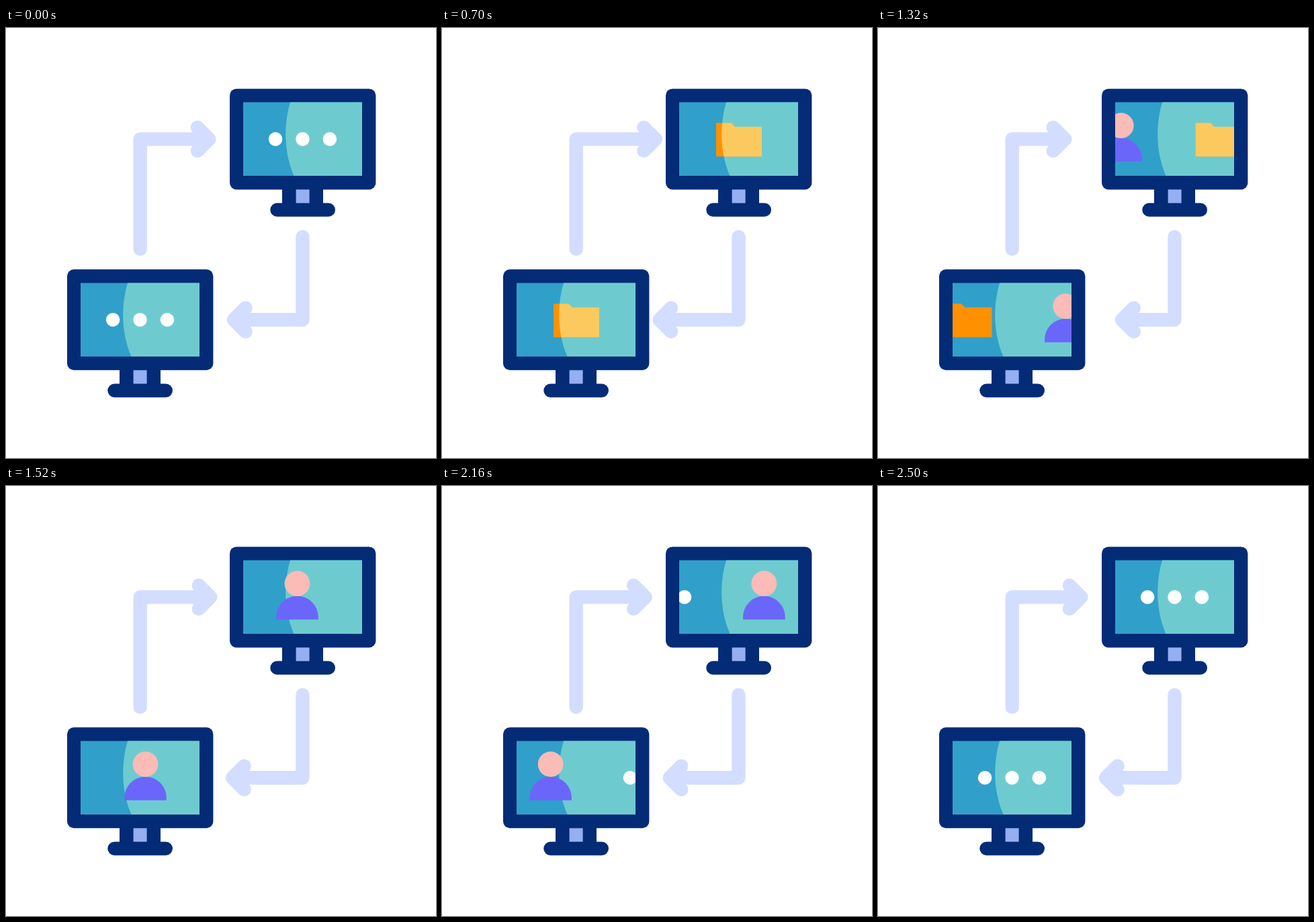
These frames come from a looping animation (640 px wide and 640 px high, 3 s). An HTML page:

```html
<!DOCTYPE html>
<html lang="en">
<head>
<meta charset="utf-8">
<title>Data exchange</title>
<style>
  html, body { margin: 0; width: 100%; height: 100%; overflow: hidden; background: #fff; }
  svg { display: block; width: 100%; height: 100%; }
  .arrow { fill: none; stroke: #d3ddff; stroke-width: 20.4; stroke-linecap: round; stroke-linejoin: round; }
</style>
</head>
<body>
<svg viewBox="0 0 640 640">
  <defs>
    <clipPath id="screen"><path d="M353 110.5H530V220H353Z"/></clipPath>
    <clipPath id="bright"><path id="glare" d="M423 110.5C412.5 146 414 187 428.5 220H530V110.5Z"/></clipPath>
    <path id="folder" d="M408 141.3H430.5L436 146.9H476V191.3H408Z"/>
    <g id="case">
      <path fill="#042b75" d="M411 235H472V265H411Z"/>
      <rect fill="#042b75" x="333" y="90.4" width="217.4" height="150" rx="10"/>
      <rect fill="#042b75" x="393.3" y="260.6" width="96.7" height="20.2" rx="10.1"/>
      <path fill="#94aff2" d="M431.6 240.4H451.6V260.6H431.6Z"/>
      <path fill="#309fca" d="M353 110.5H530V220H353Z"/>
      <use href="#glare" fill="#6dcbcf"/>
    </g>
    <g id="dots" fill="#fff">
      <circle cx="401.1" cy="165.4" r="10.3"/>
      <circle cx="441.5" cy="165.4" r="10.3"/>
      <circle cx="481.9" cy="165.4" r="10.3"/>
    </g>
    <g id="person">
      <path fill="#6b66fa" d="M410.2 198.8V195A31.3 31.3 0 0 1 472.8 195V198.8Z"/>
      <circle fill="#fbbbb7" cx="441.5" cy="145.2" r="18.9"/>
    </g>
  </defs>
  <path id="arrowUp" class="arrow"/>
  <path id="arrowDown" class="arrow"/>
  <g id="monitors"></g>
</svg>
<script>
const $ = id => document.getElementById(id);

const monitor = (x, y) => `<g transform="translate(${x} ${y})">
  <use href="#case"/>
  <g clip-path="url(#screen)">
    <use href="#folder" class="folder" fill="#ff9100"/>
    <g clip-path="url(#bright)"><use href="#folder" class="folder" fill="#fcc95f"/></g>
    <use href="#person" class="person"/>
    <use href="#dots" class="dots"/>
  </g></g>`;
$('monitors').innerHTML = monitor(0, 0) + monitor(-242, 268.9);
const screens = [...$('monitors').children];

// Every move lasts 500 ms with the same symmetric easing.
const ease = (t, start) => {
  const u = Math.min(1, Math.max(0, (t - start) / 500));
  return u * u * (3 - 2 * u);
};

function draw(t) {
  const toFolder = ease(t, 200), toPerson = ease(t, 1100), toDots = ease(t, 2000);
  const offsets = {
    dots: t < 1100 ? 160 * toFolder : 160 * (toDots - 1),
    folder: 138 * (toFolder - 1) + 156 * toPerson,
    person: 1.2 + 138 * (toPerson - 1) + 150 * toDots
  };
  screens.forEach((screen, i) => {
    for (const name in offsets)
      for (const el of screen.querySelectorAll('.' + name))
        el.setAttribute('x', i ? -offsets[name] : offsets[name]);
  });

  const push = 15.5 * (ease(t, 200) - 3 * ease(t, 700) + 3 * ease(t, 1200) - ease(t, 1700));
  const up = 302.4 + push, down = 339 - push;
  $('arrowUp').setAttribute('d', `M199.7 329V165.4H${up}m-17.5 -17.5l17.5 17.5l-17.5 17.5`);
  $('arrowDown').setAttribute('d', `M441.5 311V434.3H${down}m17.5 -17.5l-17.5 17.5l17.5 17.5`);
}

function tick() {
  draw(performance.now() % 3000);
  requestAnimationFrame(tick);
}
tick();
</script>
</body>
</html>
```
